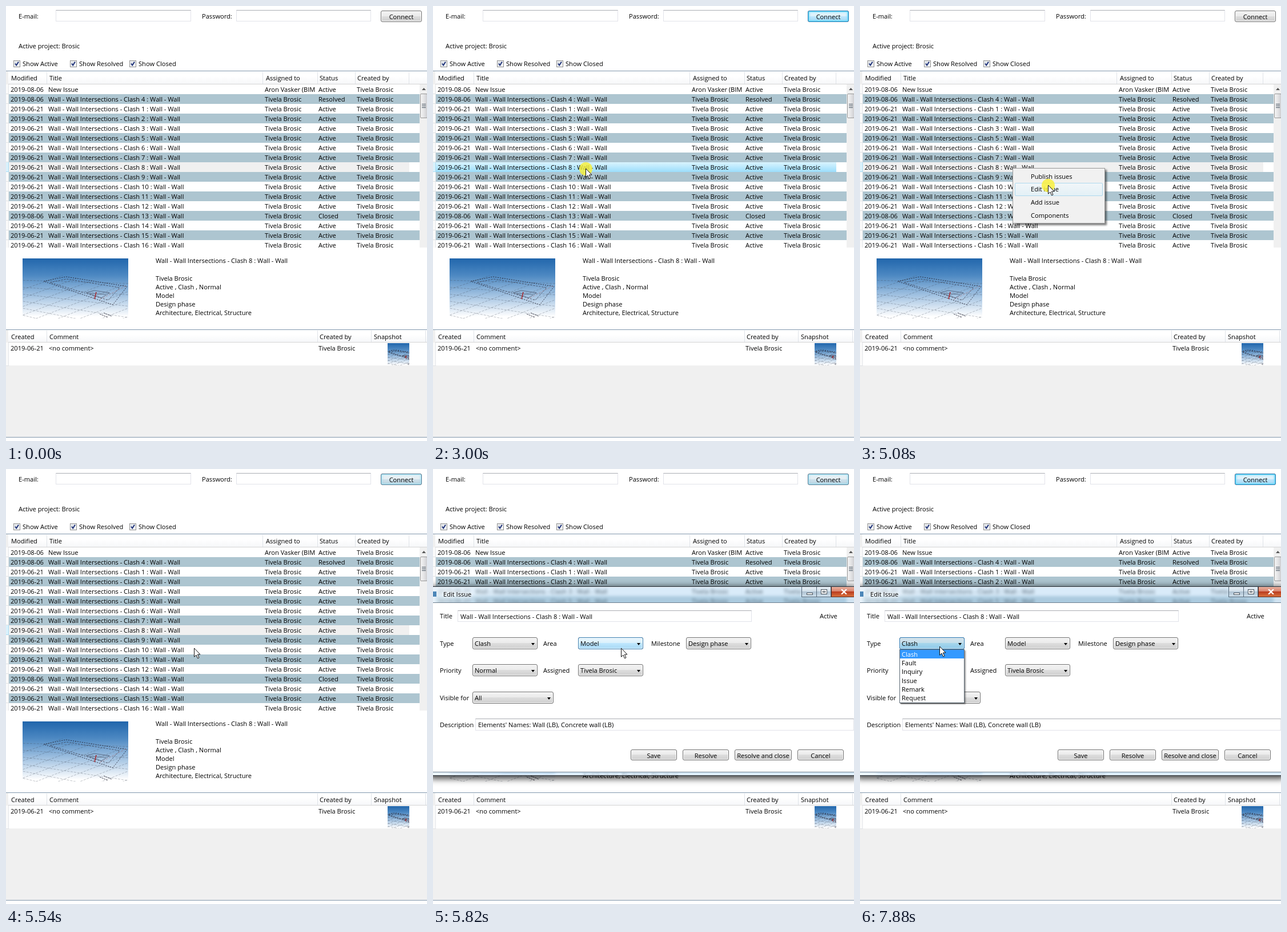
Recreate the animation shown at these times as an HTML page. Size 737 px wide and 760 px high, loop 8000 ms.

```html
<!DOCTYPE html>
<html lang="en">
<head>
<meta charset="utf-8">
<title>Issue list</title>
<style>
html, body { margin: 0; width: 100%; height: 100%; overflow: hidden; background: #fff; }
#stage { position: absolute; left: 0; top: 0; width: 737px; height: 760px; overflow: hidden;
  background: #fff; color: #000; font: 11.1px/16px "Open Sans", "Noto Sans", sans-serif; }
#stage div, #stage span, #stage svg { position: absolute; box-sizing: border-box; }
.t { white-space: pre; }
.clip { overflow: hidden; }
.center { display: block; width: 100%; text-align: center; left: 0; }

.line { background: #8298ad; }
.pane { background: #f0f0f0; }
.white { background: #fff; }
.head { background: linear-gradient(#fff 40%, #f6f7f9); border-bottom: 1px solid #d5d5d5; }
.sep { background: #dfe3e8; }
.stripe { background: #adc5d0; }
.gutter { background: #fafafa; border-right: 1px solid #e3e6e8; border-bottom: 1px solid #e0e3e5; }
.gutter.on { background: #d9f1fb; border-color: #a9dcf3; }
.idle { background: #f0f0f0; }
.picked { background: linear-gradient(#d9f4ff, #9bddfb); animation: picked 8s step-end infinite; }
.input { background: #fff; border: 1px solid #e2e3ea; border-top-color: #abadb3; }
.check { background: linear-gradient(135deg, #d3d9e0, #fff); border: 1px solid #8e8f8f; box-shadow: inset 0 0 0 1px #f4f4f4; }
.thumb { background: linear-gradient(90deg, #f5f5f5, #e4e4e6 50%, #cfcfd2); border: 1px solid #989898; border-radius: 2px; }
.grip { background: #44525f; }
.button { background: linear-gradient(#f2f2f2, #ebebeb 50%, #ddd 50%, #cfcfcf); border: 1px solid #707070;
  border-radius: 3px; box-shadow: inset 0 0 0 1px #fbfbfb; }
.hot { inset: -1px; border: 1px solid #3c7fb1; border-radius: 3px; box-shadow: inset 0 0 0 1px #f2fafe;
  background: linear-gradient(#eaf6fd, #d9f0fc 50%, #bee6fd 50%, #a7d9f5); opacity: 0; }
.arrow { right: 4px; top: 9px; border: solid transparent; border-width: 4px 3.5px 0; border-top-color: #000; }
.glow { box-shadow: inset 0 0 0 1px #46d0f8, inset 0 0 3px 2px #7fdcfa; animation: glow 8s linear infinite; }
.view { background: linear-gradient(#2166ac, #4c88c2 28%, #a3c3e2 62%, #fff 97%); overflow: hidden; }
.view path { vector-effect: non-scaling-stroke; }

.menu { background: #f1f1f1; border: 1px solid #979797; box-shadow: 3px 3px 3px rgba(0,0,0,.5);
  animation: menu 8s step-end infinite; }
.item { border: 1px solid #aed9ee; border-radius: 2px; background: linear-gradient(#f1f6f9, #e3f0f6); }
.publish { animation: publish 8s step-end infinite; }
.edit { animation: edit 8s step-end infinite; }

.dialog { border: 1px solid #28323c; border-radius: 7px; transform-origin: 398px 140px;
  background: linear-gradient(90deg, rgba(255,255,255,.5), transparent 18%), rgba(172,210,242,.45);
  box-shadow: inset 0 0 0 1px rgba(255,255,255,.7), 0 3px 12px 2px rgba(0,0,0,.75);
  animation: dialog 8s step-end infinite; }
.layer { left: 7px; top: -206px; width: 737px; height: 760px; }
.client { background: #fff; border: solid #6d7f8f; border-width: 1px 0; }
.halo { text-shadow: 0 0 5px #fff, 0 0 8px #fff, 0 0 10px #fff; }
.cap { border: 1px solid #56697a; border-top: 0; background: linear-gradient(#eaf2f8, #cfdde8 48%, #afc3d3 50%, #cfe0ec); }
.close { border: 1px solid #5c2a20; border-top: 0; border-bottom-right-radius: 5px;
  background: linear-gradient(#e9b2a0, #d88069 48%, #bb3d20 50%, #d8703c); }
.glyph { border: 1px solid #47525c; background: #fff; }
.icon { background: #4c86b8; }
.area { animation: area 8s step-end infinite; }
.type { animation: type 8s step-end infinite; }
.drop { background: #fff; border: 1px solid #5d6a75; box-shadow: 2px 2px 2px rgba(0,0,0,.4);
  animation: drop 8s step-end infinite; }
.chosen { background: #39f; }
.light { color: #fff; }

#pointer { left: 0; top: 0; }
.ring { left: -11px; top: -11px; width: 23px; height: 23px; border-radius: 50%;
  background: rgba(250,240,50,.8); animation: ring 8s step-end infinite; }

/* one percent is 80 ms */
@keyframes picked { 0%, 41.5%, 100% { opacity: 0 } 28.5% { opacity: 1 } }
@keyframes glow {
  0%, 30.5%, 45.5%, 64.5% { opacity: 0 }
  34.5%, 43.5% { opacity: 1 }
  67.5% { opacity: .5 } 71.25% { opacity: .4 } 80% { opacity: .85 } 100% { opacity: 1 }
}
@keyframes menu {
  0%, 64.5%, 100% { opacity: 0 }
  43.5% { opacity: .35 } 44.5% { opacity: .7 } 45.5% { opacity: 1 }
}
@keyframes publish { 0%, 56.5%, 100% { opacity: 0 } 52.5% { opacity: 1 } }
@keyframes edit { 0%, 64.5%, 100% { opacity: 0 } 56.5% { opacity: 1 } }
@keyframes dialog {
  0% { opacity: 0; transform: scale(.95); visibility: hidden; backdrop-filter: none }
  70.5% { opacity: .5; transform: translateY(-2px) scale(.955); visibility: visible; backdrop-filter: none }
  71.25% { opacity: .85; transform: translateY(-1px) scale(.978); backdrop-filter: none }
  72% { opacity: .95; transform: scale(.992); backdrop-filter: none }
  72.75%, 100% { opacity: 1; transform: none; visibility: visible; backdrop-filter: blur(2.5px) }
}
@keyframes area { 0%, 77.75%, 100% { opacity: 0 } 70.5% { opacity: 1 } }
@keyframes type {
  0% { opacity: 0; filter: none }
  80.6% { opacity: 1; filter: none }
  84.75%, 100% { opacity: 1; filter: saturate(1.3) brightness(.92) }
}
@keyframes drop {
  0% { clip-path: inset(0 0 100% 0); visibility: hidden }
  86.5% { clip-path: inset(0 -6px 70% 0); visibility: visible }
  87.5% { clip-path: inset(0 -6px 35% 0) }
  88.5% { clip-path: inset(0 -6px 10% 0) }
  89.5%, 100% { clip-path: inset(0 -6px -6px 0); visibility: visible }
}
@keyframes ring {
  0%, 30.5%, 38.5%, 64.5%, 86.5%, 100% { opacity: 0 }
  28.5%, 37.5%, 63.5%, 84.75% { opacity: 1 }
}
</style>
</head>
<body>
<div id="stage"></div>
<script>
const USER = 'Tivela Brosic';
const ISSUE = 'Wall - Wall Intersections - Clash ';

// y is the middle of the text line
const text = (x, y, s, cls = '') =>
  `<span class="t ${cls}" style="left:${x}px;top:${y - 8}px">${s}</span>`;
const box = (cls, x, y, w, h, inner = '') =>
  `<div class="${cls}" style="left:${x}px;top:${y}px;width:${w}px;height:${h}px">${inner}</div>`;
const list = (n, make) => Array.from({ length: n }, (_, i) => make(i)).join('');
const label = (s, y) => `<span class="t center" style="top:${y}px">${s}</span>`;
const button = (x, y, w, h, s, hot = '') => box('button', x, y, w, h, hot + label(s, Math.round(h / 2 - 8)));
const combo = (x, y, w, s, hot = '') => box('button', x, y, w, 21,
  (hot && `<div class="hot ${hot}"></div>`) + text(3, 10, s) + '<div class="arrow"></div>');

function header(y, h, seps, titles) {
  return box('line', 0, y, 737, 1) + box('head', 4, y + 1, 733, h) + box('pane', 0, y + 1, 4, h)
    + seps.map(x => box('sep', x, y + 2, 1, h - 2)).join('')
    + titles.map(([x, s]) => text(x, y + 13, s)).join('');
}

function view(x, y, w, h) {
  const floor = list(8, i => `M-5 ${38 + i * 12}L190 ${44 + i * 20}`)
    + list(9, i => `M-5 ${56 + i * 15}L${70 + i * 27} ${30 + i * 4}`);
  const path = (d, color, width, dash = '') =>
    `<path d="${d}" stroke="${color}" stroke-width="${width}" stroke-dasharray="${dash}"/>`;
  return `<svg class="view" style="left:${x}px;top:${y}px" width="${w}" height="${h}"
    viewBox="0 0 185 105" preserveAspectRatio="xMidYMid slice" fill="none">`
    + path(floor, 'rgba(65,75,90,.55)', .6, '4 2')
    + path('M37 40L76 32L183 49L158 81Z', '#223', .9, '2 2')
    + path('M48 42L77 36L170 51L150 73Z', '#334', .7, '3 2')
    + path('M112 60L125 56L152 60L138 69ZM118 61L145 63', '#223', 1, '1 1')
    + path('M135 97l14 6M142 95l14 6', '#223', .8, '3 1')
    + path('M135 72L183 47', '#a66', .5, '4 2')
    + path('M129 59L126 71', '#a32026', 1.5) + '</svg>';
}

function loginBar() {
  const check = (x, s) => box('check', x, 95, 12, 12,
    '<svg width="10" height="10" fill="none" stroke="#21347a" stroke-width="2"><path d="M2 4.5L4.2 7.5L8 1.5"/></svg>')
    + text(x + 16, 101, s);
  return text(22, 18, 'E-mail:') + box('input', 87, 7, 237, 20)
    + text(343, 18, 'Password:') + box('input', 403, 7, 236, 20)
    + button(656, 8, 72, 20, 'Connect', '<div class="hot glow"></div>')
    + text(22, 70, 'Active project: ' + USER.split(' ')[1])
    + check(13, 'Show Active') + check(112, 'Show Resolved') + check(216, 'Show Closed');
}

function issueRow(i) {
  const n = i === 1 ? 4 : i < 5 ? i - 1 : i;
  const y = 17 * i, mid = y + 9;
  const date = [0, 1, 13].includes(i) ? '2019-08-06' : '2019-06-21';
  const status = { 1: 'Resolved', 13: 'Closed' }[i] || 'Active';
  const back = i % 2 ? box('stripe', 4, y, 720, 17)
    : i === 8 ? box('idle', 5, y, 701, 17) + box('picked', 5, y, 701, 17) : '';
  return back + box('gutter' + (i === 8 ? ' on' : ''), 0, y, 5, 17)
    + text(8, mid, date) + text(74, mid, i ? `${ISSUE}${n} : Wall - Wall` : 'New Issue')
    + box('clip', 453, y, 90, 17, text(0, 9, i ? USER : 'Aron Vasker (BIM'))
    + text(547, mid, status) + text(614, mid, USER);
}

function issueList() {
  const bar = box('pane', 724, 137, 13, 285)
    + '<svg style="left:728px;top:143px" width="7" height="4"><path d="M0 4L3.5 0L7 4Z" fill="#555"/></svg>'
    + box('thumb', 725, 153, 13, 43) + list(3, i => box('grip', 728, 171 + i * 3, 7, 1));
  return header(113, 23, [71, 449, 545, 611, 705],
    [[9, 'Modified'], [76, 'Title'], [455, 'Assigned to'], [549, 'Status'], [615, 'Created by']])
    + box('clip', 0, 137, 724, 285, list(17, issueRow)) + bar;
}

function details() {
  const lines = [USER, 'Active , Clash , Normal', 'Model', 'Design phase', 'Architecture, Electrical, Structure'];
  return view(29, 441, 185, 105) + text(262, 445, ISSUE + '8 : Wall - Wall')
    + lines.map((s, i) => text(262, 476 + i * 15.1, s)).join('');
}

function comments() {
  return box('pane', 0, 566, 737, 187) + box('white', 4, 588, 733, 40)
    + header(565, 22, [71, 545, 639, 734],
      [[9, 'Created'], [76, 'Comment'], [549, 'Created by'], [644, 'Snapshot']])
    + box('gutter', 0, 588, 5, 41)
    + text(8, 598, '2019-06-21') + text(75, 598, '&lt;no comment&gt;') + text(547, 598, USER)
    + view(668, 589, 38, 39) + box('line', 0, 753, 737, 1);
}

function menu() {
  const items = ['Publish issues', 'Edit issue', 'Add issue', 'Components'];
  return box('menu', 267, 283, 162, 97,
    box('item publish', 3, 2, 154, 23) + box('item edit', 3, 25, 154, 23)
    + items.map((s, i) => text(31, 13.5 + i * 22.8, s)).join(''));
}

function dialog() {
  const caption = box('icon', 0, 214, 6, 9) + text(18, 219, 'Edit Issue', 'halo')
    + box('cap', 645, 206, 27, 18, box('glyph', 8, 10, 11, 4))
    + box('cap', 671, 206, 26, 18, box('glyph', 7, 4, 11, 9, box('glyph', 2, 2, 5, 3)))
    + box('close', 697, 206, 44, 18,
      '<svg style="left:16px;top:4px" width="11" height="9"><path d="M1 0L10 9M10 0L1 9" stroke="#fff" stroke-width="2.4"/></svg>');
  const labels = [[12, 257, 'Title'], [677, 257, 'Active'], [12, 305, 'Type'], [193, 305, 'Area'],
    [382, 305, 'Milestone'], [12, 352, 'Priority'], [193, 352, 'Assigned'],
    [12, 400, 'Visible for'], [12, 447, 'Description']];
  const fields = box('input', 43, 247, 515, 20, text(4, 9.5, ISSUE + '8 : Wall - Wall'))
    + combo(69, 294, 114, 'Clash', 'type') + combo(254, 294, 114, 'Model', 'area')
    + combo(443, 294, 114, 'Design phase') + combo(69, 341, 114, 'Normal')
    + combo(254, 341, 114, USER) + combo(69, 389, 142, 'All')
    + box('input', 74, 436, 663, 21, text(4, 10, "Elements' Names: Wall (LB), Concrete wall (LB)"));
  const buttons = button(346, 490, 81, 19, 'Save') + button(437, 490, 81, 19, 'Resolve')
    + button(528, 490, 100, 19, 'Resolve and close') + button(638, 490, 81, 19, 'Cancel');
  const types = ['Clash', 'Fault', 'Inquiry', 'Issue', 'Remark', 'Request'];
  const drop = box('drop', 69, 315, 114, 94, box('chosen', 0, 0, 112, 15)
    + types.map((s, i) => text(3, 8 + i * 15.2, s, i ? '' : 'light')).join(''));
  return box('dialog', -8, 205, 753, 331, '<div class="layer">' + caption
    + box('client', 0, 233, 737, 297) + labels.map(a => text(...a)).join('')
    + fields + buttons + drop + '</div>');
}

const pointer = `<div id="pointer"><div class="ring"></div>
  <svg style="left:-1px;top:-1px" width="15" height="21"><path d="M1.5 1V16.2L5 13L7.6 18.8L10 17.7L7.4 12H12Z"
  fill="#fff" stroke="#111" stroke-linejoin="round"/></svg></div>`;

document.getElementById('stage').innerHTML =
  loginBar() + issueList() + details() + comments() + menu() + dialog() + pointer;

const smooth = u => u * u * (3 - 2 * u);
const slowing = u => 1 - (1 - u) ** 2;
const moves = [
  { start: 840, tick: 80, steps: 11, from: [642, 677], to: [267, 284], ease: slowing },
  { start: 4040, tick: 80, steps: 8, from: [267, 284], to: [329, 313], ease: smooth },
  { start: 5844, tick: 76, steps: 10, from: [329, 313], to: [163, 299], ease: smooth },
  { start: 7240, tick: 80, steps: 8, from: [163, 299], to: [139, 310], ease: smooth }
];
const hand = document.getElementById('pointer');
let begin;

function frame(now) {
  begin ??= now;
  const t = (now - begin) % 8000;
  const move = moves.filter(m => t >= m.start).pop();
  hand.style.visibility = move ? 'visible' : 'hidden';
  if (move) {
    const step = Math.min(move.steps, Math.floor((t - move.start) / move.tick + .01));
    const u = move.ease(step / move.steps);
    const [x, y] = move.from.map((a, i) => Math.round(a + (move.to[i] - a) * u));
    hand.style.transform = `translate(${x}px, ${y}px)`;
  }
  requestAnimationFrame(frame);
}
requestAnimationFrame(frame);
</script>
</body>
</html>
```
